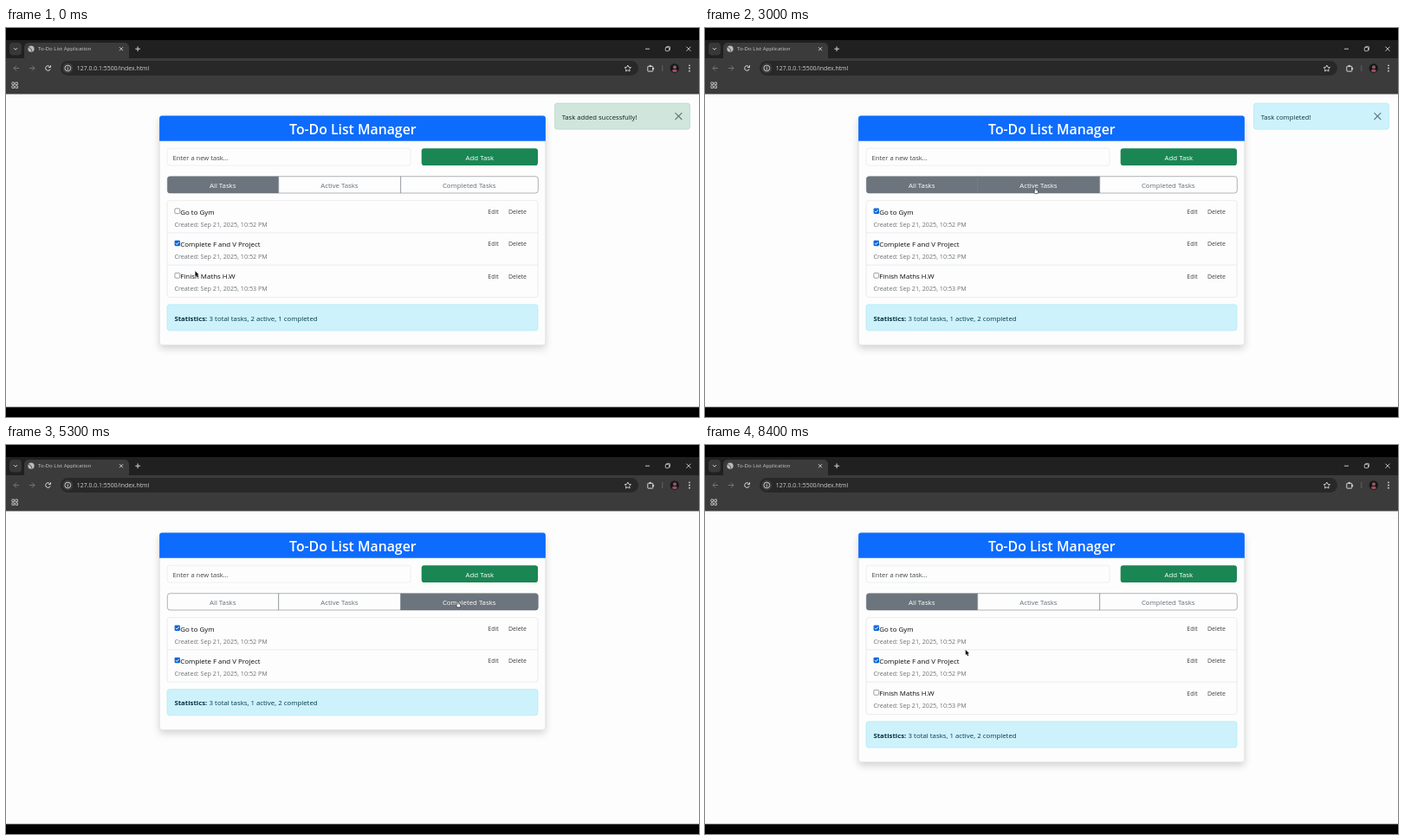
These frames come from a looping animation (800 px wide and 450 px high, 8.5 s). An HTML page with a canvas:

```html
<!DOCTYPE html>
<html lang="en">
<head>
<meta charset="utf-8">
<title>To-Do List Application</title>
<style>
html, body { margin: 0; width: 100%; height: 100%; overflow: hidden; background: #000; }
canvas { display: block; width: 800px; height: 450px; }
</style>
</head>
<body>
<canvas id="stage"></canvas>
<script>
const LOOP = 8500, STEP = 100, FADE = 150, TRAVEL = 900;
const CHECK_AT = 1650, ACTIVE_AT = 3290, DONE_AT = 4592, ALL_AT = 6290, TOAST_OUT = 4655;
const GREY = '#6c757d', PAGE = '#fdfdfd', LIGHT = '#d6d6d6', BAR = '#3b3b3b', RULE = '#dcdfe2';

// Page layout: card edges, content edges, gap between blocks
const CARD_L = 177.1, CARD_R = 622.9, CARD_T = 101.6, CARD_MID = 400;
const LEFT = 186, RIGHT = 614, WIDTH = RIGHT - LEFT;
const GAP = 8.33, FIELD_H = 19.8, ALERT_H = 30.2, ROW = 37.3, RADIUS = 3.1;
const FIELD_Y = 139.2, TABS_Y = FIELD_Y + FIELD_H + 1.5 * GAP, LIST_Y = TABS_Y + FIELD_H + GAP;

const canvas = document.getElementById('stage');
const ctx = canvas.getContext('2d');
const dpr = window.devicePixelRatio || 1;
canvas.width = 800 * dpr;
canvas.height = 450 * dpr;

const tasks = [
  { name: 'Go to Gym', time: '10:52', done: t => t >= CHECK_AT },
  { name: 'Complete F and V Project', time: '10:52', done: () => true },
  { name: 'Finish Maths H.W', time: '10:53', done: () => false }
];

const cells = [
  { label: 'All Tasks', x: LEFT, w: 128.4 },
  { label: 'Active Tasks', x: LEFT + 128.4, w: 141 },
  { label: 'Completed Tasks', x: LEFT + 269.4, w: WIDTH - 269.4 }
];

// Where the pointer rests and when it gets there
const stops = [
  { at: 0, x: 218.3, y: 281 },
  { at: 1400, x: 196.8, y: 210.5 },
  { at: 2900, x: 380.5, y: 185 },
  { at: 3850, x: 531.2, y: 181.3 },
  { at: 6100, x: 261, y: 180.5 },
  { at: 7700, x: 300.7, y: 236.8 }
];

const ease = k => k * k * (3 - 2 * k);
const clamp = k => Math.min(1, Math.max(0, k));

function pointer(t) {
  let { x, y } = stops[0];
  for (const s of stops.slice(1)) {
    const k = ease(clamp((t - s.at) / TRAVEL + 1));
    x += (s.x - x) * k;
    y += (s.y - y) * k;
  }
  return { x, y };
}

const selected = t => t < ACTIVE_AT ? 0 : t < DONE_AT ? 1 : t < ALL_AT ? 2 : 0;

function hovered(t) {
  const p = pointer(t);
  if (p.y < TABS_Y || p.y > TABS_Y + FIELD_H) return -1;
  return cells.findIndex(c => p.x >= c.x && p.x < c.x + c.w);
}

// Share of the last FADE ms in which a button was lit
function shade(i, t) {
  const n = 50;
  let lit = 0;
  for (let k = 0; k < n; k++) {
    const u = Math.max(0, t - FADE * k / n);
    if (selected(u) === i || hovered(u) === i) lit++;
  }
  return lit / n;
}

function mix(a, b, k) {
  return `rgb(${a.map((v, i) => Math.round(v + (b[i] - v) * k))})`;
}

function rect(x, y, w, h, color) {
  ctx.fillStyle = color;
  ctx.fillRect(x, y, w, h);
}

function paint(fill, stroke, lw) {
  if (fill) { ctx.fillStyle = fill; ctx.fill(); }
  if (stroke) { ctx.strokeStyle = stroke; ctx.lineWidth = lw; ctx.stroke(); }
}

function box(x, y, w, h, r, fill, stroke, lw = 0.55) {
  ctx.beginPath();
  ctx.roundRect(x, y, w, h, r);
  paint(fill, stroke, lw);
}

function disc(x, y, r, fill, stroke, lw = 0.9) {
  ctx.beginPath();
  ctx.arc(x, y, r, 0, 7);
  paint(fill, stroke, lw);
}

function line(color, lw, ...pts) {
  ctx.beginPath();
  for (let i = 0; i < pts.length; i += 2) ctx.lineTo(pts[i], pts[i + 1]);
  paint(null, color, lw);
}

function text(s, x, y, size, color, align = 'left', weight = 400) {
  ctx.font = `${weight} ${size}px "Open Sans", "Noto Sans", sans-serif`;
  ctx.textAlign = align;
  ctx.fillStyle = color;
  ctx.fillText(s, x, y);
}

// Text on a box whose middle is at mid
function label(s, x, mid, size, color, align, weight) {
  text(s, x, mid + size * 0.48, size, color, align, weight);
}

function cross(x, y, r, color, lw) {
  line(color, lw, x - r, y - r, x + r, y + r);
  line(color, lw, x + r, y - r, x - r, y + r);
}

function star(x, y, r) {
  ctx.beginPath();
  for (let i = 0; i < 10; i++) {
    const a = (i * 0.2 - 0.5) * Math.PI, d = i % 2 ? r / 2 : r;
    ctx.lineTo(x + d * Math.cos(a), y + d * Math.sin(a));
  }
  ctx.closePath();
  paint(null, LIGHT, 0.9);
}

// Arrow head pointing along dir (1 = left, -1 = right)
function navArrow(x, y, dir) {
  const r = 3 * dir;
  line('#7c7c7c', 0.9, x - r, y, x + r, y);
  line('#7c7c7c', 0.9, x, y - 3, x - r, y, x, y + 3);
}

function tabStrip() {
  const y = 24.2;
  rect(0, 14, 800, 23, '#202020');
  box(4, 17, 14, 14.5, 4, '#383838');
  line(LIGHT, 1, 9, y - 1, 11, y + 1, 13, y - 1);
  box(21, 17, 121, 22, 5, BAR);
  disc(29, y, 3.6, '#b9bcc0');
  line('#55585c', 1, 26, y - 2, 29, y, 30, y + 3);
  text('To-Do List Application', 37, 26.3, 6.1, '#c9c9c9');
  cross(133, y, 2, LIGHT, 0.9);
  line(LIGHT, 1, 149.3, y, 155, y);
  line(LIGHT, 1, 152.1, y - 2.8, 152.1, y + 2.8);
  line(LIGHT, 0.9, 738, y, 743, y);
  box(762.3, y - 2.8, 4.2, 4.2, 0.8, null, LIGHT, 0.8);
  box(761.3, y - 1.8, 4.2, 4.2, 0.8, '#202020', LIGHT, 0.8);
  cross(788, y, 2.5, LIGHT, 0.9);
}

function toolbar() {
  const y = 46.5;
  rect(0, 35, 800, 42, BAR);
  navArrow(12, y, 1);
  navArrow(30, y, -1);
  ctx.beginPath();
  ctx.arc(48.5, y, 2.8, 0.3, 5.5);
  paint(null, LIGHT, 1);
  line(LIGHT, 1, 51.5, y - 3.3, 51.5, y - 1, 49.1, y - 1);

  box(63, 38, 667, 17, 8.5, '#282828');
  disc(71.3, y, 5.9, BAR);
  disc(71.3, y, 3.4, null, LIGHT);
  line(LIGHT, 0.9, 71.3, y - 0.4, 71.3, y + 2);
  disc(71.3, y - 1.6, 0.5, LIGHT);
  text('127.0.0.1:5500/index.html', 81.8, 49.4, 6.9, '#d0d0d0');
  star(717.8, y + 0.4, 3.9);

  // Extensions, profile, menu
  box(740.8, y - 2.2, 6, 5.8, 0.5, null, LIGHT, 1);
  disc(743.7, y - 2.6, 1.1, LIGHT);
  disc(747.2, y + 0.6, 1.1, LIGHT);
  line('#686868', 0.9, 757.8, 43, 757.8, 50);
  disc(771.8, y, 5.2, '#17161a');
  box(769.2, y + 1.5, 5.4, 3, 1.4, '#a34b62');
  disc(772, y - 1.2, 2, '#8b6058');
  for (const d of [-3.2, 0, 3.2]) disc(789, y + d, 0.9, LIGHT);

  for (let i = 0; i < 4; i++)
    box(6.9 + 4 * (i % 2), 62.9 + 4 * (i >> 1), 2.6, 2.6, 0.2, null, LIGHT, 0.8);
}

function buttons(t) {
  cells.forEach((c, i) => {
    const k = shade(i, t);
    const left = i === 0 ? RADIUS : 0, right = i === 2 ? RADIUS : 0;
    box(c.x + 0.3, TABS_Y + 0.2, c.w, FIELD_H - 0.5, [left, right, right, left],
      mix([253, 253, 253], [108, 117, 125], k), GREY);
    label(c.label, c.x + c.w / 2, TABS_Y + FIELD_H / 2, 7.8,
      mix([100, 109, 117], [255, 255, 255], k), 'center');
  });
}

function checkbox(x, y, on) {
  if (!on) return box(x, y, 5.8, 5.8, 1, '#fff', '#777', 0.7);
  box(x - 0.3, y - 0.3, 6.4, 6.4, 1.1, '#0b68d8');
  line('#fff', 1, x + 1.1, y + 3, x + 2.4, y + 4.3, x + 4.8, y + 1.5);
}

function taskRow(task, y, t) {
  checkbox(194.9, y + 9.2, task.done(t));
  text(task.name, 201.3, y + 15.9, 7.9, '#08090b');
  text(`Created: Sep 21, 2025, ${task.time} PM`, 194.5, y + 30.2, 7.2, '#6d7277');
  text('Edit', 556.3, y + 15.4, 6.95, '#3a3e42');
  text('Delete', 580, y + 15.4, 6.95, '#3a3e42');
}

function card(t) {
  const sel = selected(t);
  const shown = tasks.filter(k => sel === 0 || k.done(t) === (sel === 2));
  const done = tasks.filter(k => k.done(t)).length;
  const listH = shown.length * ROW;
  const statsY = LIST_Y + listH + GAP;
  const w = CARD_R - CARD_L, h = statsY + ALERT_H + 2 * GAP - CARD_T;

  ctx.save();
  ctx.shadowColor = 'rgba(0,0,0,.17)';
  ctx.shadowBlur = GAP * dpr;
  ctx.shadowOffsetY = GAP / 2 * dpr;
  box(CARD_L, CARD_T, w, h, RADIUS, PAGE);
  ctx.restore();
  box(CARD_L + 0.2, CARD_T, w - 0.4, h, RADIUS, PAGE, '#d5d5d6');
  box(CARD_L, CARD_T, w, FIELD_Y - GAP - CARD_T, [RADIUS, RADIUS, 0, 0], '#0d6cfd');
  text('To-Do List Manager', CARD_MID + 0.3, 123, 15.8, '#fff', 'center', 600);

  const mid = FIELD_Y + FIELD_H / 2;
  box(LEFT, FIELD_Y, 281.2, FIELD_H, RADIUS, PAGE, '#dfe3e7');
  label('Enter a new task...', 192.5, mid, 7.6, '#42474b');
  box(479.7, FIELD_Y, RIGHT - 479.7, FIELD_H, RADIUS, '#1a8653');
  label('Add Task', (479.7 + RIGHT) / 2, mid, 7.9, '#fff', 'center');
  buttons(t);

  box(LEFT, LIST_Y, WIDTH, listH, RADIUS, PAGE, RULE);
  shown.forEach((task, i) => {
    const y = LIST_Y + i * ROW;
    if (i) line(RULE, 0.55, LEFT, y, RIGHT, y);
    taskRow(task, y, t);
  });

  const statsMid = statsY + ALERT_H / 2;
  box(LEFT, statsY, WIDTH, ALERT_H, RADIUS, '#cdf2fb', '#9fe6f4');
  label('Statistics:', 194.4, statsMid, 7.8, '#06323c', 'left', 700);
  label(`3 total tasks, ${3 - done} active, ${done} completed`, 234.6, statsMid, 7.85, '#063c48');
}

function toast(t) {
  const added = t < CHECK_AT;
  const y = 87, mid = y + ALERT_H / 2;
  ctx.save();
  ctx.globalAlpha = clamp(1 - (t - TOAST_OUT) / FADE);
  box(633.4, y, 156.2, ALERT_H, RADIUS, added ? '#d0e6dc' : '#cdf2fb', added ? '#a6cfbc' : '#a2e5f2');
  label(added ? 'Task added successfully!' : 'Task completed!', 641.7, mid, 7.7,
    added ? '#052417' : '#063640');
  cross(776.4, mid, 3.9, added ? '#68756f' : '#66797e', 1.1);
  ctx.restore();
}

function arrow(x, y) {
  line('#0a0a0a', 1.3, x + 1.5, y + 4, x + 3, y + 7);
  ctx.beginPath();
  ctx.moveTo(x, y);
  ctx.lineTo(x, y + 6);
  ctx.lineTo(x + 4.3, y + 4.3);
  ctx.closePath();
  paint('#0a0a0a', 'rgba(255,255,255,.6)', 0.4);
}

function hand(x, y) {
  box(x - 0.7, y, 1.4, 4, 0.7, '#fff', '#222', 0.7);
  box(x - 1.8, y + 2.6, 4.6, 4, 1.3, '#fff', '#222', 0.7);
  rect(x - 0.4, y + 1, 0.8, 3, '#fff');
}

function draw() {
  const t = Math.floor(performance.now() % LOOP / STEP) * STEP;
  const p = pointer(t);
  ctx.setTransform(dpr, 0, 0, dpr, 0, 0);
  rect(0, 0, 800, 450, '#000');
  tabStrip();
  toolbar();
  rect(0, 76.5, 800, 362, PAGE);
  card(t);
  toast(t);
  (hovered(t) < 0 ? arrow : hand)(p.x, p.y);
  requestAnimationFrame(draw);
}
draw();
</script>
</body>
</html>
```
